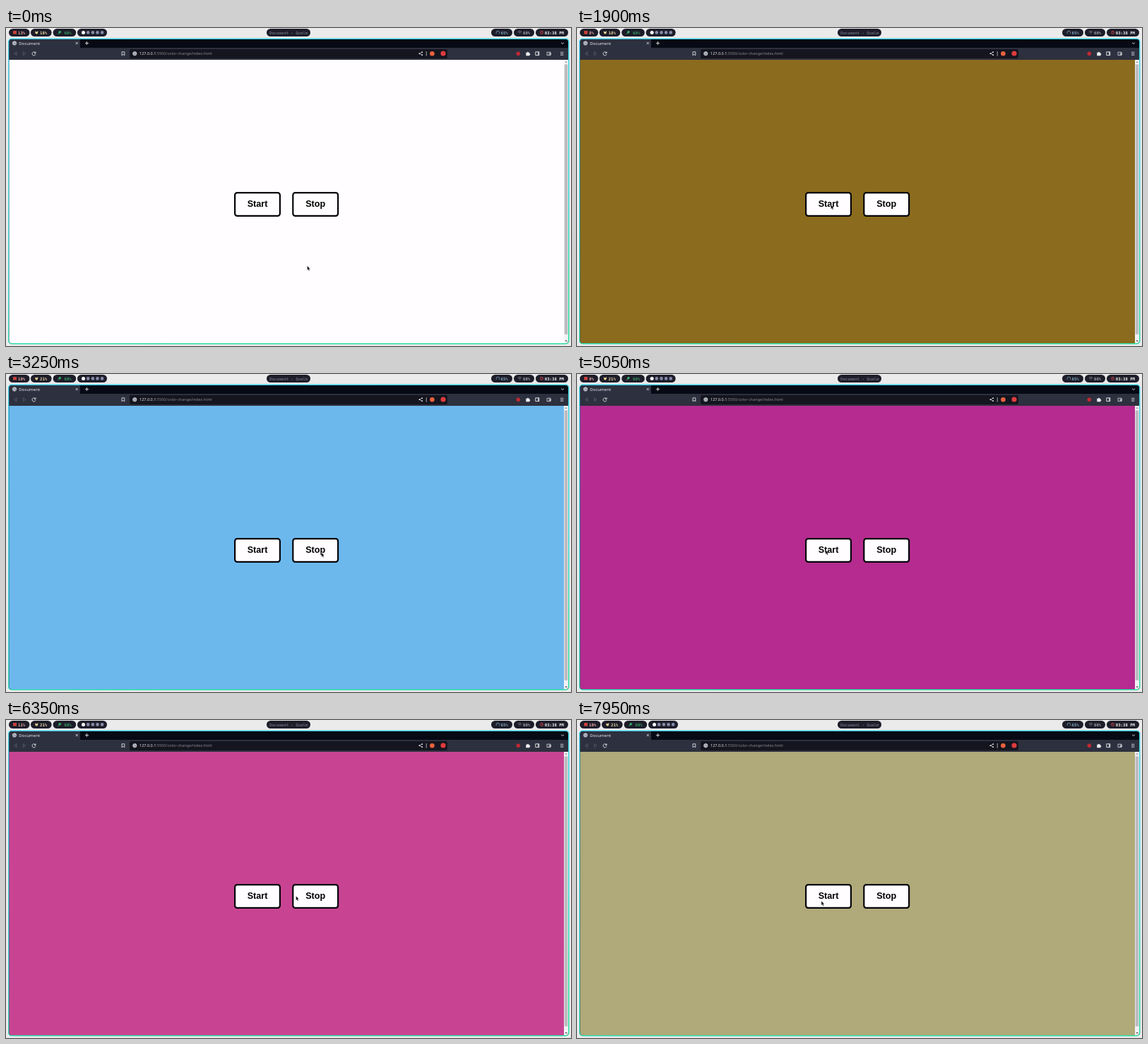
These frames come from a looping animation (800 by 450 pixels, 8000 ms). An HTML page:

```html
<!DOCTYPE html>
<html lang="en">
<head>
<meta charset="utf-8">
<title>Color change</title>
<style>
  html, body { margin: 0; width: 100%; height: 100%; overflow: hidden; background: #ebebec; }
  svg { display: block; width: 800px; height: 450px; }
  .mono { font: bold 5.65px "DejaVu Sans Mono", monospace; }
  .ui { font: 6.1px "Noto Sans", sans-serif; }
  .url { font-size: 5.5px; }
  .button rect { fill: #fffdff; stroke: #05050a; stroke-width: 2.2; }
  .button text { font: bold 12.6px "Liberation Sans", Arial, sans-serif; text-anchor: middle; }
  .line { fill: none; stroke: #dcdce2; stroke-width: .9; }
  .pill { fill: #1d1d29; }
</style>
</head>
<body>
<svg viewBox="0 0 800 450">
  <defs>
    <linearGradient id="edge" x1="0" y1="0" x2="0.3" y2="1">
      <stop offset="0" stop-color="#43d3ee"/>
      <stop offset=".75" stop-color="#35d6d0"/>
      <stop offset="1" stop-color="#2bdda0"/>
    </linearGradient>
  </defs>

  <!-- Desktop bar -->
  <g class="mono">
    <g id="cpu">
      <rect id="cpuPill" class="pill" x="4" y="1" width="29.4" height="11" rx="5.5"/>
      <path d="M10 4.2h5v4.2h-5z" fill="#e0493f"/>
      <path d="M10 6.2h5" stroke="#8c2927" stroke-width=".6"/>
      <text id="cpuText" x="17" y="8.6" fill="#eda6a0"></text>
    </g>
    <g id="shifted">
      <rect class="pill" x="35" y="1" width="29.6" height="11" rx="5.5"/>
      <path d="M41.2 4.5l2 1 2.2-1.2-.4 3-1.5 1.5-2-1.3z" fill="#ecd295"/>
      <text id="memText" x="48" y="8.6" fill="#ead9a5"></text>
      <rect class="pill" x="66.6" y="1" width="32.6" height="11" rx="5.5"/>
      <path d="M73.2 9l2-2.2M74.5 6l1.8-2 1.6 1.6-1.8 2z" fill="#35b86c" stroke="#35b86c" stroke-width=".8"/>
      <text x="82.5" y="8.6" fill="#329a60">60%</text>
      <rect class="pill" x="101" y="1" width="42" height="11" rx="5.5"/>
      <circle cx="109.5" cy="6.4" r="2.5" fill="#fff"/>
      <g fill="#858baa">
        <circle cx="116.2" cy="6.4" r="2.3"/><circle cx="122.9" cy="6.4" r="2.3"/>
        <circle cx="129.5" cy="6.4" r="2.3"/><circle cx="136.1" cy="6.4" r="2.3"/>
      </g>
    </g>
    <rect class="pill" x="369" y="1" width="62" height="11" rx="5.5"/>
    <text x="373" y="8.5" fill="#636575">Document - Quelm</text>
    <rect class="pill" x="687" y="1" width="30" height="11" rx="5.5"/>
    <path d="M694.2 8V6.4a2.2 2.2 0 0 1 4.4 0V8" fill="none" stroke="#6f96b4" stroke-width=".9"/>
    <text x="700.5" y="8.6" fill="#7e9fb8">65%</text>
    <rect class="pill" x="719" y="1" width="29" height="11" rx="5.5"/>
    <path d="M724.8 5.5q2.6-2 5.2 0M726 7q1.4-1 2.8 0M727.4 8.3v.3" fill="none" stroke="#92929e" stroke-width=".8"/>
    <text x="732" y="8.6" fill="#a0a0a9">60%</text>
    <rect class="pill" x="750" y="1" width="46" height="11" rx="5.5"/>
    <circle cx="758.5" cy="6.4" r="2" fill="none" stroke="#cf444d" stroke-width=".9"/>
    <path d="M758.5 5.2v1.4h1" fill="none" stroke="#cf444d" stroke-width=".5"/>
    <text x="762.8" y="8.6" fill="#f1eef1">03:38 PM</text>
  </g>

  <!-- Browser window -->
  <rect x="3" y="14.5" width="794.5" height="433" rx="5" fill="url(#edge)"/>
  <rect x="4.5" y="16" width="791.5" height="430" rx="3.5" fill="#070914"/>
  <path d="M4.5 28V19.5q0-3.5 3.5-3.5H105v12z" fill="#2d303e"/>
  <path d="M4.5 28h791.5v17H4.5z" fill="#2d303e"/>
  <rect x="175" y="30" width="450" height="13" rx="2" fill="#15151f"/>
  <g class="ui" fill="#e8e8ee">
    <text x="18.3" y="23.8">Document</text>
    <text class="url" x="189" y="38.2">127.0.0.1<tspan fill="#85868e">:5500/color-change/index.html</tspan></text>
  </g>
  <g class="line">
    <g id="globe" stroke-width=".7">
      <circle cx="12" cy="21.5" r="2.7" fill="#8b909d"/>
      <path d="M9.6 20.6l2 .6.3 2.3M12.3 19l.3 1.3 1.8.6"/>
    </g>
    <use href="#globe" x="170.3" y="14.7"/>
    <path d="M98.7 19.9l3.2 3.2m0-3.2l-3.2 3.2M112 21.5h5m-2.5-2.5v5M786 20.7l2 1.8 2-1.8"/>
    <path d="M15 33.7v5l-3.5-2.5zM24.5 33.7v5l3.5-2.5z" stroke="#616475" stroke-width=".7"/>
    <path d="M41.6 35a2.5 2.5 0 1 0 .3 2.2M42 33.5v2h-2" stroke-width="1"/>
    <path d="M164 33.8h3.8v5l-1.9-1.5-1.9 1.5z"/>
    <path d="M589.2 34.2l-3.8 2 3.8 2" stroke-width=".7"/>
    <path d="M595.2 33v6.7" stroke-width=".7"/>
    <path d="M749.8 33.8h5v4.8h-5zM753.6 34v4.5" stroke-width="1"/>
    <path d="M766 34.2h5v4.4h-5zM769 35.8h2.5v1.6H769z" stroke-width=".8"/>
    <path d="M785 34.3h4.4M785 36.3h4.4M785 38.3h4.4" stroke-width=".8"/>
  </g>
  <g fill="#ececf0">
    <circle cx="589.2" cy="34.2" r=".9"/><circle cx="585.4" cy="36.2" r=".9"/><circle cx="589.2" cy="38.2" r=".9"/>
    <path d="M736.3 34.7h1.5a1 1 0 0 1 2 0h1.5v1.5a1 1 0 0 1 0 2v1h-5z"/>
  </g>
  <circle cx="603.4" cy="36.3" r="3.3" fill="#e9613d"/>
  <circle cx="619" cy="36" r="3.6" fill="#df3b3d"/>
  <circle cx="725.3" cy="36.3" r="2.8" fill="#bd2933"/>

  <!-- Page -->
  <path id="page" d="M4.5 45H790v401H8q-3.5 0-3.5-3.5z"/>
  <path d="M790 45h6v397.5q0 3.5-3.5 3.5H790z" fill="#f3f1f4"/>
  <rect x="790.8" y="51.5" width="4.4" height="382" fill="#bcbbc0"/>
  <path d="M791.5 49l1.6-2 1.6 2z" fill="#8a898f"/>
  <path d="M791.5 442l1.6 2 1.6-2z" fill="#4b4b50"/>
  <g class="button">
    <rect x="324.1" y="233.1" width="63.8" height="32.8" rx="3.3"/>
    <text x="356" y="253.4">Start</text>
    <rect x="406.3" y="233.1" width="63.8" height="32.8" rx="3.3"/>
    <text x="438.2" y="253.4">Stop</text>
  </g>
  <path id="cursor" d="M0 0v6.2l1.4-1.2 1 2.3 1.1-.5-1-2.2h1.8z" fill="#08080c" stroke="#fff" stroke-width=".35"/>
</svg>

<script>
  const DURATION = 8000, STEP = 50;
  const $ = id => document.getElementById(id);

  // Keyframes: time, then the value's components.
  const colors = [
    [0, 255, 253, 255], [1400, 255, 253, 255],
    [1900, 139, 107, 29], [2250, 139, 107, 29],
    [3000, 108, 184, 237], [4500, 108, 184, 237],
    [5050, 181, 43, 143], [5700, 198, 38, 168], [6150, 198, 38, 168],
    [6900, 210, 208, 44], [7600, 210, 208, 44], [7950, 176, 169, 121]
  ];
  const pointer = [
    [0, 426.5, 336.5], [350, 426.5, 336.5], [1100, 359.5, 250], [2300, 359.5, 250],
    [2950, 446.5, 252.5], [3800, 446.5, 252.5], [4450, 352, 249], [5200, 352, 249],
    [5700, 410.5, 249], [7150, 410.5, 249], [7500, 346, 256]
  ];
  const cpuLoads = [13, 8, 8, 10, 9, 9, 11, 9, 10];

  function sample(keys, t) {
    const next = keys.findIndex(key => key[0] > t);
    if (next < 0) return keys.at(-1).slice(1);
    const [from, to] = [keys[next - 1], keys[next]];
    const p = (t - from[0]) / (to[0] - from[0]);
    const eased = p * p * (3 - 2 * p);
    return from.slice(1).map((v, i) => v + (to[i + 1] - v) * eased);
  }

  function draw(t) {
    $("page").setAttribute("fill", `rgb(${sample(colors, t).map(Math.round)})`);
    $("cursor").setAttribute("transform", `translate(${sample(pointer, t)})`);

    // The meters refresh once a second; a one-digit load narrows its pill.
    const load = cpuLoads[Math.floor((t + 250) / 1000)];
    const shift = load < 10 ? -3.4 : 0;
    $("cpuText").textContent = load + "%";
    $("cpuPill").setAttribute("width", 29.4 + shift);
    $("shifted").setAttribute("transform", `translate(${shift})`);
    $("memText").textContent = t < 2750 ? "18%" : "21%";
  }

  const start = performance.now();
  function tick() {
    const t = (performance.now() - start) % DURATION;
    draw(Math.floor(t / STEP) * STEP);
    requestAnimationFrame(tick);
  }
  tick();
</script>
</body>
</html>
```
